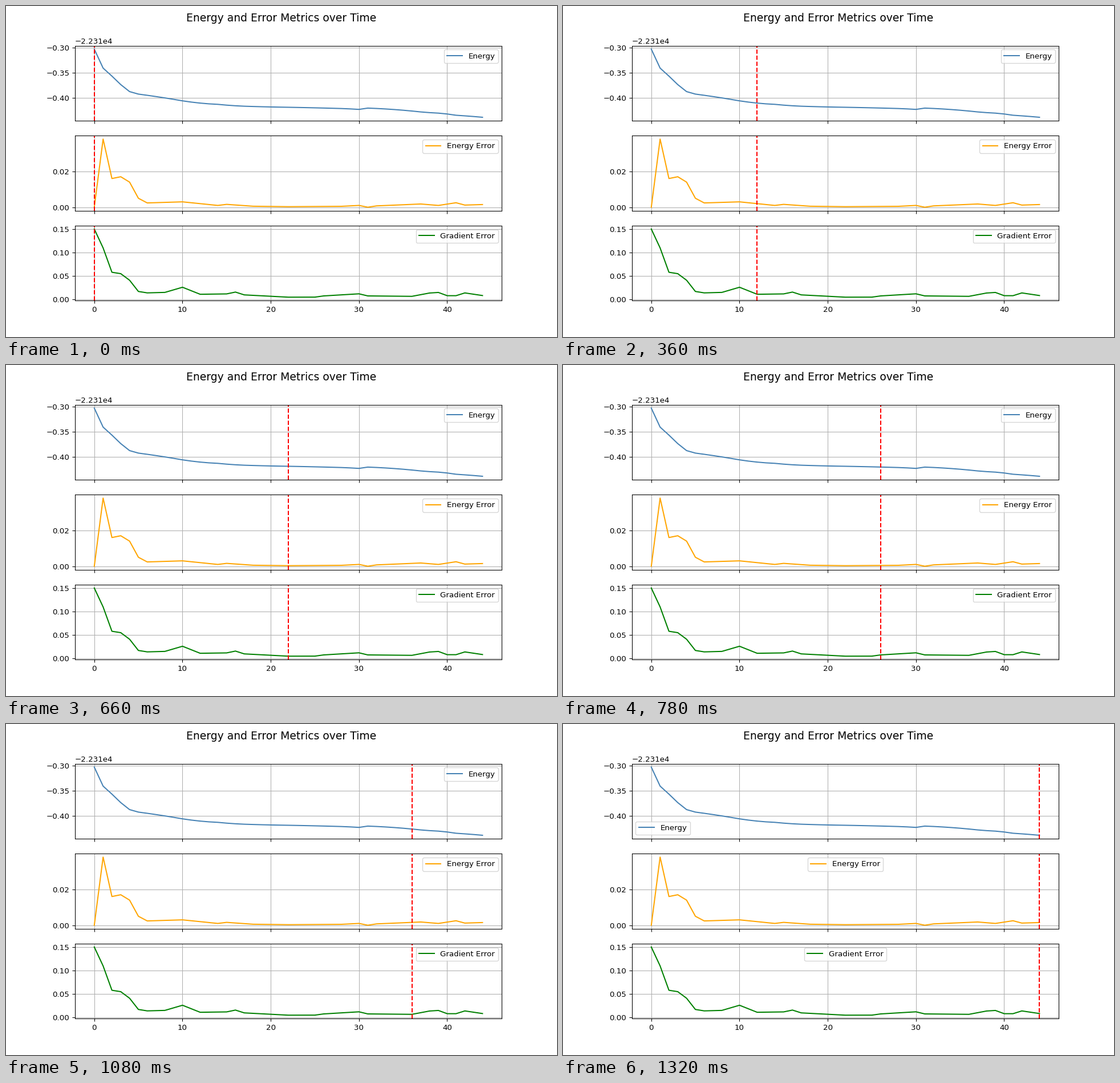
A matplotlib script for the animation above (1350 ms loop, 966 by 580 pixels).

```python
import numpy as np
import matplotlib.pyplot as plt
from matplotlib.animation import FuncAnimation

plt.rcParams["font.family"] = "DejaVu Sans"

INTERVAL = 30
steps = np.arange(45)


def through(*knots):
    """Straight segments through (step, thousandths) key points."""
    at, value = zip(*knots)
    return np.interp(steps, at, value) / 1000


energy_error = through(
    (0, 0), (1, 38), (2, 16), (3, 17), (4, 14), (5, 5), (6, 2.4), (10, 3),
    (14, 1), (15, 1.6), (18, 0.55), (22, 0.3), (28, 0.5), (30, 1), (31, 0),
    (32, 0.75), (37, 1.8), (39, 1), (41, 2.5), (42, 1.2), (44, 1.5))

gradient_error = through(
    (0, 150.3), (1, 110), (2, 58), (3, 55), (4, 41), (5, 17), (6, 14), (8, 15),
    (10, 26), (12, 11), (15, 11.8), (16, 15.7), (17, 9.7), (22, 4.8), (25, 4.9),
    (26, 7.5), (30, 12), (31, 7.5), (36, 6.6), (38, 13.7), (39, 14.9), (40, 8),
    (41, 8), (42, 13.9), (44, 8.3))

# The error is the energy lost per step; where it is zero the energy rises a little.
rise = np.where((energy_error == 0) & (steps > 0), 0.0026, 0)
energy = -22310.3025 + np.cumsum(rise - energy_error)

# 966 x 580 pixels
fig, axes = plt.subplots(3, 1, sharex=True, figsize=(10, 6.0042), dpi=96.6)
fig.subplots_adjust(left=0.125, right=0.9, bottom=0.11, top=0.88, hspace=0.2)
fig.suptitle("Energy and Error Metrics over Time", fontsize=14)

curves = [
    (energy, "Energy", "steelblue"),
    (energy_error, "Energy Error", "orange"),
    (gradient_error, "Gradient Error", "green"),
]
cursors = []
for ax, (values, label, color) in zip(axes, curves):
    ax.plot(steps, values, color=color, label=label)
    cursors.append(ax.axvline(0, color="red", linestyle="--"))
    ax.grid(True)
    # "best" lets the legend step aside when the cursor reaches it.
    ax.legend(loc="best")


def update(step):
    for cursor in cursors:
        cursor.set_xdata([step, step])
    return cursors


anim = FuncAnimation(fig, update, frames=len(steps), interval=INTERVAL,
                     repeat=True, repeat_delay=0)
plt.show()
```
